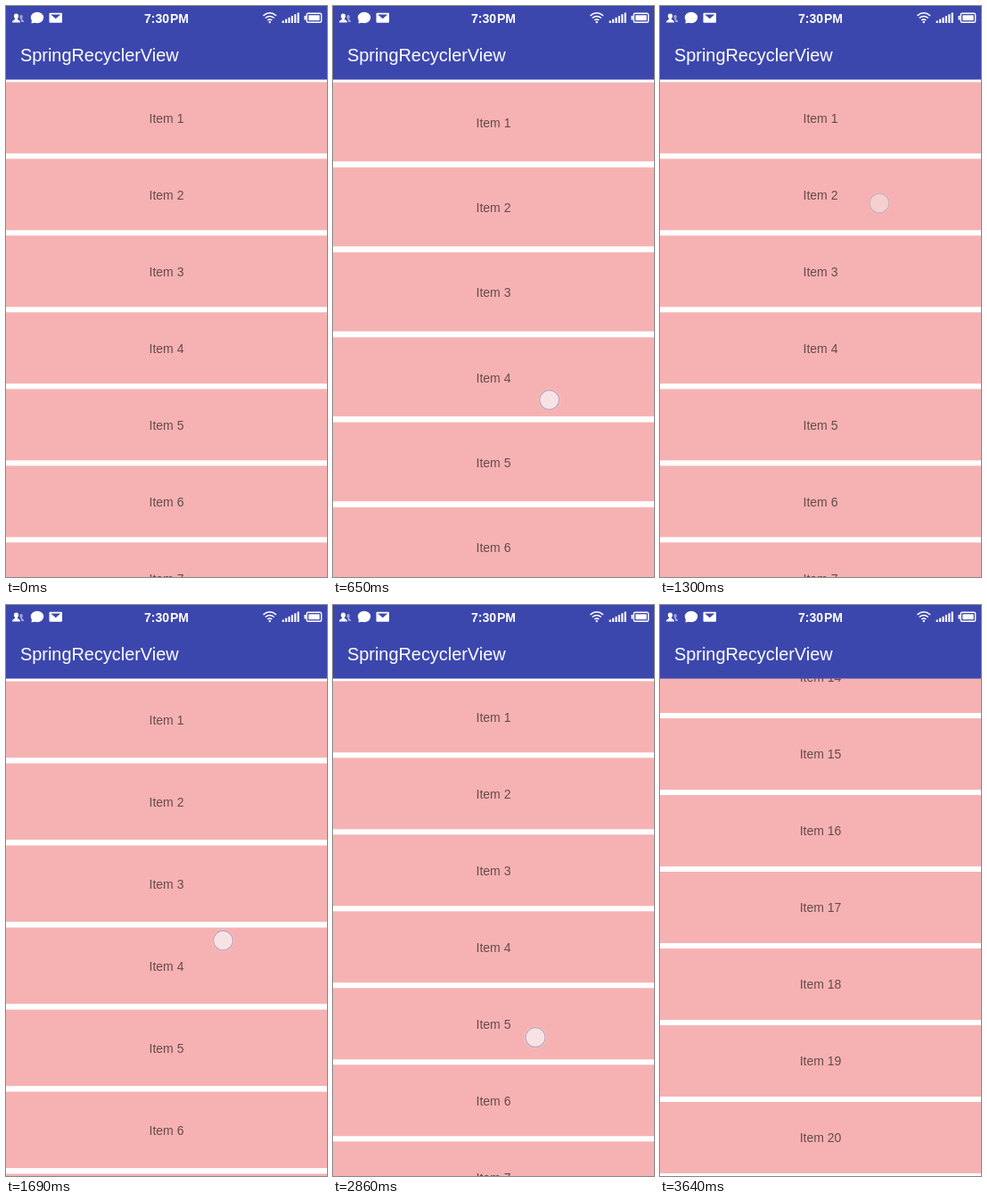
An HTML page that plays this animation: 360 by 640 pixels, repeating every 3.77 s.

```html
<!DOCTYPE html>
<html lang="en">
<head>
<meta charset="utf-8">
<title>SpringRecyclerView</title>
<style>
  html, body { margin: 0; width: 100%; height: 100%; overflow: hidden; background: #fff; }
  svg { display: block; width: 360px; height: 640px; font-family: "Liberation Sans", Arial, sans-serif; }
  #list rect { fill: #f6b2b3; }
  #list text { font-size: 14px; fill: #664a4b; text-anchor: middle; }
</style>
</head>
<body>
<svg viewBox="0 0 360 640">
  <rect width="360" height="640" fill="#fff"/>
  <g id="list"></g>
  <g id="touch">
    <circle r="12.500" fill="#fff" opacity=".25"/>
    <circle r="11" fill="#f6e6e6" fill-opacity=".9" stroke="#c3a6bd" stroke-width="1.300"/>
  </g>

  <rect width="360" height="82.500" fill="#3c47ae"/>
  <g fill="#fff">
    <text x="16" y="62" font-size="19.900">SpringRecyclerView</text>
    <text x="155" y="18.500" font-size="14" font-weight="bold" word-spacing="-2.900">7:30 PM</text>

    <!-- contacts, chat, mail -->
    <path d="M11.500 8.500c-3.500 0-3 4.500-1.300 5.500c0 2-3.200 1.500-3.200 4.500h9c0-3-3.200-2.500-3.200-4.500c1.700-1 2.200-5.500-1.300-5.500z"/>
    <path d="M17 10c-2 0-2 3-.8 4.300c0 1.500 1 1.500 1 3.700h3c0-2.700-2.200-2.200-2.200-3.700c1.200-1.300 1.200-4.300-1-4.300z" opacity=".5"/>
    <ellipse cx="35" cy="13" rx="7.200" ry="6.200"/>
    <path d="M29 15l-.5 4.500 5-1z"/>
    <rect x="48.500" y="7.800" width="14.500" height="11" rx="1"/>
    <path d="M50.200 9.500h11.100l-5.550 4.800z" fill="#3c47ae"/>

    <!-- wifi, signal, battery -->
    <g fill="none" stroke="#fff" stroke-width="1.500">
      <path d="M288.500 10.800q7.300-6 14.600 0M290.800 13.500q5-4 10 0M293.200 16q2.600-2 5.200 0"/>
      <rect x="337.300" y="8.300" width="16.400" height="9.900" rx="1.500" stroke-width="1.400"/>
    </g>
    <circle cx="295.800" cy="18" r="1.200"/>
    <g id="signal"></g>
    <rect x="339.300" y="10.300" width="12.400" height="5.900"/>
    <rect x="334.500" y="11" width="2" height="4.500"/>
  </g>
</svg>

<script>
const LOOP = 3770, STEP = 130, TOP = 82.3, BOTTOM = 640, PITCH = 86, COUNT = 20;
const END = COUNT * PITCH, MAX_SCROLL = END - (BOTTOM - TOP);
const DRAG_TIME = 780, FLICK_TIME = 390, RETURN_TIME = 364;
const FLICK_START = 2730, SCROLL_START = 2860, SCROLL_END = SCROLL_START + FLICK_TIME;
const pulls = [{ at: 130, from: 203, to: 521 }, { at: 1300, from: 221, to: 531 }];

const $ = id => document.getElementById(id);
const list = $('list'), touch = $('touch');

for (let i = 0; i < COUNT; i++) {
  list.innerHTML += `<rect y="${i * PITCH + 3}" width="360" height="80"/>
    <text x="180" y="${i * PITCH + 48.4}">Item ${i + 1}</text>`;
}
for (let i = 0; i < 6; i++) {
  const h = 2.5 + 1.8 * i;
  $('signal').innerHTML += `<rect x="${309.7 + 3.4 * i}" y="${19 - h}" width="2.1" height="${h}"/>`;
}

const clamp = u => Math.max(0, Math.min(1, u));
const ease = u => (1 - Math.cos(Math.PI * clamp(u))) / 2;
const settle = dt => 1 - ease(dt / RETURN_TIME);
const fade = u => u < 0 || u > 1 ? 0 : Math.min(1, .6 + 3 * u, .35 + 4 * (1 - u));

function moveTouch(x, y, opacity) {
  touch.setAttribute('transform', `translate(${x} ${y})`);
  touch.setAttribute('opacity', opacity);
}

function stretchList(edge, origin, amount) {
  list.setAttribute('transform', `translate(0 ${edge}) scale(1 ${1 + amount}) translate(0 ${-origin})`);
}

function drawPull(t) {
  const { at, from, to } = pulls.findLast(p => t >= p.at) ?? pulls[0];
  const u = (t - at) / DRAG_TIME;
  const drag = (to - from) * ease(u);
  moveTouch(246 - 5 * u, from + drag, fade(u));
  stretchList(TOP, 0, drag * .00045 * settle(t - at - DRAG_TIME));
}

function drawFlick(t) {
  const u = (t - FLICK_START) / FLICK_TIME;
  moveTouch(225 + 18 * u * u, 488 - 270 * u ** 4, fade(u));
  if (t < SCROLL_END) {
    stretchList(TOP, MAX_SCROLL * clamp((t - SCROLL_START) / FLICK_TIME) ** 2, 0);
  } else {
    stretchList(BOTTOM, END, .05 * settle(t - SCROLL_END));
  }
}

const start = performance.now();
function tick() {
  // The screen refreshes in fixed steps
  const t = Math.floor((performance.now() - start) % LOOP / STEP) * STEP;
  (t < FLICK_START ? drawPull : drawFlick)(t);
  requestAnimationFrame(tick);
}
tick();
</script>
</body>
</html>
```
